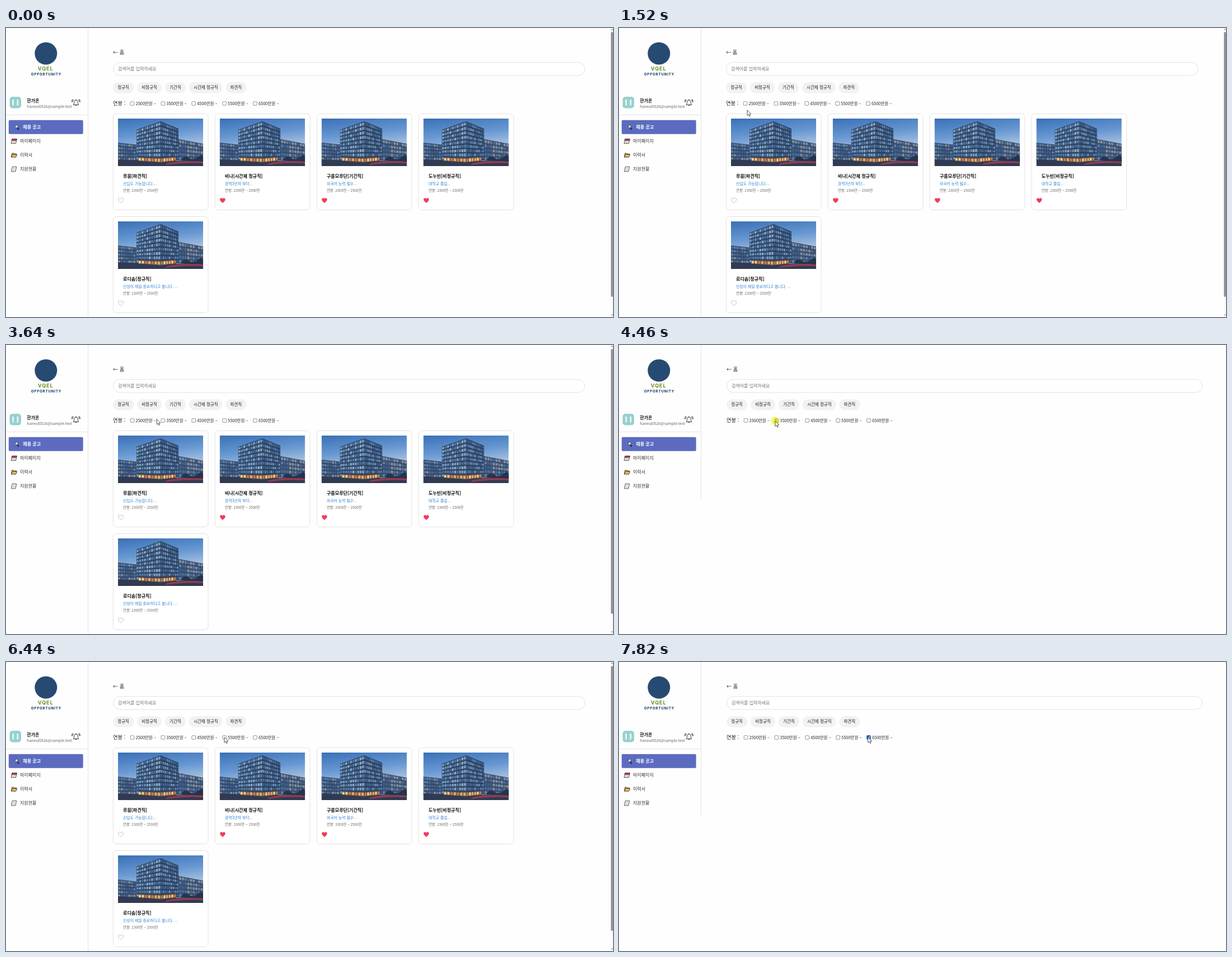
Animation of 1084 by 517 pixels, one loop 8 s. Source, as an HTML page:

```html
<!DOCTYPE html>
<html lang="ko">
<head>
<meta charset="utf-8">
<title>채용 공고</title>
<style>
  html, body { margin: 0; width: 100%; height: 100%; overflow: hidden; background: #fefefe; }
  svg { display: block; width: 100%; height: 100%; }
  text { font-family: "Noto Sans CJK KR", "Noto Sans CJK", "Noto Sans", sans-serif; white-space: pre; }
  .logo { font-family: Inter, sans-serif; font-weight: 800; text-anchor: middle; }
</style>
</head>
<body>
<svg id="stage" viewBox="0 0 1084 517" lang="ko"></svg>
<script>
const LOOP = 8000;
const PITCH = 54.85;
const CARD = { w: 170, h: 172 };

const text = (x, y, size, str, fill = '#222', extra = '') =>
  `<text x="${x}" y="${y}" font-size="${size}" fill="${fill}" ${extra}>${str}</text>`;
const rect = (x, y, w, h, fill, extra = '') =>
  `<rect x="${x}" y="${y}" width="${w}" height="${h}" fill="${fill}" ${extra}/>`;
const path = (d, fill, extra = '') => `<path d="${d}" fill="${fill}" ${extra}/>`;
const bold = 'font-weight="700"';

let seed = 11;
const rand = () => (seed = (seed * 16807) % 2147483647) / 2147483647;
const pick = list => list[Math.floor(rand() * list.length)];

// One facade: a grid of windows between a left and a right edge [x, top, bottom]
function facade(a, b, cols, rows, wall, glass) {
  const mix = (p, q, k) => p + (q - p) * k;
  const at = (u, v) => {
    const y = mix(mix(a[1], b[1], u), mix(a[2], b[2], u), v);
    return mix(a[0], b[0], u).toFixed(1) + ' ' + y.toFixed(1);
  };
  const quad = (u, v, w, h) => `M${at(u, v)}L${at(u + w, v)}L${at(u + w, v + h)}L${at(u, v + h)}Z`;
  let out = path(quad(0, 0, 1, 1), wall);
  for (let r = 0; r < rows; r++)
    for (let c = 0; c < cols; c++)
      out += path(quad((c + .12) / cols, (r + .2) / rows, .76 / cols, .64 / rows), pick(glass));
  return out;
}

function photo() {
  const front = ['#6d90b6', '#5579a5', '#7f9fc0', '#4a6b96', '#93a9bd'];
  const side = ['#5d80aa', '#496b98', '#7392b6', '#3f5f8b'];
  const low = ['#4c6c95', '#5f80a6', '#405e88', '#8c9095'];
  const warm = ['#f0cb8c', '#e0aa70', '#c07a58'];
  let out = rect(0, 0, 152, 85, 'url(#sky)');
  out += facade([0, 43, 75], [36, 47, 75], 8, 5, '#33486a', low);
  out += facade([104, 36, 75], [152, 45, 77], 10, 5, '#364d70', low);
  out += facade([33, 20, 74], [76, 5, 77], 10, 9, '#2c4568', front);
  out += facade([76, 5, 77], [108, 18, 74], 9, 9, '#29405f', side);
  out += path('M0 73L76 77L152 74V85H0Z', '#303a52');
  out += facade([36, 69, 76], [76, 70, 79], 7, 1, '#59483f', warm);
  out += facade([76, 70, 79], [104, 68, 76], 6, 1, '#59483f', warm);
  out += path('M112 75Q118 64 126 70T142 69T152 68V77Z', '#25344c');
  out += path('M88 80Q116 74 152 77V80Q122 78 84 83Z', '#b53d52', 'opacity=".75"');
  return out;
}

const heartPath = 'M0 4.4C-2.2 2.5-4.7.6-4.7-1.8C-4.7-3.4-3.5-4.4-2.3-4.4C-1.2-4.4-.4-3.8 0-2.9' +
  'C.4-3.8 1.2-4.4 2.3-4.4C3.5-4.4 4.7-3.4 4.7-1.8C4.7.6 2.2 2.5 0 4.4Z';

const jobs = [
  ['루뭄[파견직]', '신입도 가능합니다....', 0],
  ['비냐[시간제 정규직]', '경력3년차 부터...', 1],
  ['구름모루단[기간직]', '외국어 능력 필수...', 1],
  ['도누빈[비정규직]', '대학교 졸업...', 1],
  ['로디솜[정규직]', '인성이 제일 중요하다고 봅니다. ...', 0]
];
const cardAt = i => [191 + (i % 4) * 181.85, 153 + Math.floor(i / 4) * 184];

function card([title, note, liked], i) {
  const ink = liked ? '#ef3b5b' : '#b5b5b5';
  return `<g transform="translate(${cardAt(i)})">` +
    rect(.4, .4, CARD.w - .4, CARD.h, '#fff',
      `id="card${i}" rx="5.5" stroke="#dcdcdc" stroke-width=".8"`) +
    '<use href="#photo" x="9" y="9"/>' +
    text(18, 114.6, 8.05, title, '#111', bold) +
    text(18, 127.6, 6.88, note, '#2a80d2') +
    text(18, 139.6, 6.4, '연봉: 2300만 ~ 2500만', '#666') +
    path(heartPath, liked ? ink : '#fff',
      `transform="translate(14 155.6)" stroke="${ink}" stroke-width="${liked ? .2 : .8}"`) +
    '</g>';
}

function pills() {
  let x = 191;
  return ['정규직', '비정규직', '기간직', '시간제 정규직', '파견직'].map(label => {
    const w = (label.replace(' ', '').length * .92 + (label.includes(' ') ? .224 : 0)) * 7.55 + 16.4;
    const out = rect(x, 97, w, 19.5, '#f2f2f2', 'rx="9.7"') + text(x + 8.2, 109.4, 7.55, label);
    x += w + 5.7;
    return out;
  }).join('');
}

const boxes = () => [2500, 3500, 4500, 5500, 6500].map((n, i) => {
  const x = 221.8 + i * PITCH;
  return rect(x + .4, 131.7, 6.6, 6.6, '#fff', 'rx="1.2" stroke="#767676" stroke-width=".8"') +
    `<g id="tick${i}">` + rect(x, 131.3, 7.4, 7.4, '#0b63ce', 'rx="1.3"') +
    path(`M${x + 1.5} 135.2l1.6 1.6l2.9-3.6`, 'none', 'stroke="#fff" stroke-width="1.1"') + '</g>' +
    text(x + 9.7, 137.9, 7.45, n + '만원 ~');
}).join('');

function menuIcons() {
  const ink = 'stroke="#333" stroke-width=".8"';
  const slant = (y, body) => `<g transform="translate(14 ${y}) skewX(-12)">${body}</g>`;
  return slant(177.5, path('M6.4 1L9 3.8', 'none', 'stroke="#222" stroke-width="1.8" stroke-linecap="round"') +
      `<circle cx="4.6" cy="-1.2" r="2.7" fill="#bfe0f5" ${ink}/>`) +
    slant(202.5, rect(-4, -4, 8.4, 8.2, '#f3f3f3', ink) + rect(-4, -4, 8.4, 2.8, '#dd3a45', ink) +
      path('M-2.6 .6h5.6M-2.6 2.4h5.6', 'none', 'stroke="#aaa" stroke-width=".7"')) +
    slant(227.5, path('M-4-3.4h3l1 1h4.4v5.8h-8.4Z', '#d99a3c', ink) +
      path('M-4 3.4L-2.6-.8h8L4.4 3.4Z', '#f6c76a', ink)) +
    slant(252.5, rect(-3.6, -4.3, 7.4, 8.6, '#fafafa', ink) +
      path('M-2-2h4.2M-2 0h4.2M-2 2h4.2', 'none', 'stroke="#999" stroke-width=".6"'));
}

function sidebar() {
  const line = 'stroke="#dedede" stroke-width=".8"';
  return '<circle cx="71.3" cy="45.5" r="20" fill="#274a72"/>' +
    text(70.6, 76.3, 9, 'VQEL', '#7c9a3d', 'class="logo" letter-spacing=".9"') +
    text(72, 84.8, 6.1, 'OPPORTUNITY', '#274a72', 'class="logo" letter-spacing=".85"') +
    rect(6.5, 123, 20.5, 20.5, '#95d1cf', 'rx="5"') +
    rect(11.4, 128, 2.6, 10.5, '#f2f6f6') + rect(19.5, 128, 2.6, 10.5, '#f2f6f6') +
    text(37.3, 132.7, 8, '한가온', '#111', bold) +
    text(37.3, 143.1, 6.8, 'haneul0526@sample.test', '#666') +
    path('M120.4 137.2Q121.7 136 121.7 132.4Q121.9 128.9 124.9 128.9T128.1 132.4Q128.1 136 129.4 137.2Z' +
      'M123.5 137.5Q124.9 140.4 126.3 137.5M124.9 127.8V128.9' +
      'M120.3 128.2Q118.9 129.6 119 132M118.6 127.6Q117.2 129.5 117.4 132' +
      'M129.5 128.2Q130.9 129.6 130.8 132M131.2 127.6Q132.6 129.5 132.4 132',
      'none', 'stroke="#222" stroke-width=".9" stroke-linecap="round"') +
    `<path d="M0 155.5H146.5" ${line}/><path id="edge" ${line}/>` +
    rect(4.8, 164.7, 132.9, 25.1, '#5c6bc0', 'rx="2"') +
    text(30.3, 180.4, 8.05, '채용 공고', '#fff', bold) +
    ['마이페이지', '이력서', '지원현황'].map((s, i) => text(25, 205.4 + 25 * i, 8, s, '#333')).join('') +
    menuIcons();
}

const stage = document.getElementById('stage');
stage.innerHTML =
  `<defs><linearGradient id="sky" x1="0" y1="0" x2=".2" y2="1">
    <stop offset="0" stop-color="#3a70b6"/><stop offset=".4" stop-color="#6798d2"/>
    <stop offset=".75" stop-color="#b4c8e2"/></linearGradient>
    <filter id="lift" x="-10%" y="-10%" width="120%" height="120%">
    <feDropShadow dx="0" dy="2" stdDeviation="2.6" flood-opacity=".12"/></filter>
    <g id="photo">${photo()}</g></defs>` +
  rect(0, 0, 1084, 517, '#fefefe') + sidebar() +
  '<g id="head">' + text(191, 47, 9.2, '← 홈') +
  rect(191.4, 61.7, 842.4, 23.2, '#fff', 'id="search" rx="11.6" stroke="#dadada" stroke-width=".8"') +
  text(200, 76.4, 8, '검색어를 입력하세요', '#757575') + pills() +
  text(191, 138.4, 9.3, '연봉 :') + boxes() + '</g>' +
  `<g id="list">${jobs.map(card).join('')}` +
  rect(1079.5, 0, 4.5, 517, '#fafafa') + rect(1080.4, 7, 3.4, 474, '#8b8b8b', 'rx="1.7"') +
  path('M1080.4 3.4h3.4L1082.1 1ZM1080.4 512.4h3.4L1082.1 514.8Z', '#8b8b8b') + '</g>' +
  '<circle id="press" r="7.4" fill="#f8f41c" opacity=".74"/>' +
  path('M0 0V9.6L2.2 7.6L3.8 11.1L5.4 10.4L3.9 7.1L6.8 6.9Z', '#fff',
    'id="arrow" stroke="#222" stroke-width=".75" stroke-linejoin="round"');

const $ = id => document.getElementById(id);
const show = (id, on) => $(id).setAttribute('visibility', on ? 'visible' : 'hidden');

// Pointer stops: time, x, y
const stops = [
  [210, 996, 488], [770, 238, 131], [980, 244, 168], [1310, 244, 168], [1520, 229, 147],
  [2280, 225.3, 138], [2950, 225.3, 138], [3400, 256, 128], [3840, 279, 136],
  [4530, 279, 136], [4810, 333.3, 134.5], [5550, 333.3, 134.5], [6510, 390.8, 134.5],
  [7050, 390.8, 134.5], [7750, 444.7, 134.5], [LOOP, 444.7, 134.5]
];
// Each box: press to check, press to uncheck; the page answers DELAY later
const DELAY = 70;
const clicks = [[2350, 2880], [3840, 4460], [5010, 5480], [6580, 6980], [7750, LOOP]];
const within = (t, from, to) => t >= from && t < to;
const checked = (t, [on, off]) => within(t, on + DELAY, off + DELAY);

function pointer(t) {
  const i = Math.max(1, stops.findIndex(s => s[0] > t));
  const [t0, x0, y0] = stops[i - 1], [t1, x1, y1] = stops[i];
  const k = Math.min(1, Math.max(0, (t - t0) / (t1 - t0)));
  const e = i === 1 ? 1 - (1 - k) ** 2 : k * k * (3 - 2 * k);
  return [x0 + (x1 - x0) * e, y0 + (y1 - y0) * e];
}

function draw(t) {
  const empty = clicks.slice(1).some(c => checked(t, c));
  const [px, py] = pointer(t);
  const at = `translate(${px.toFixed(2)} ${py.toFixed(2)})`;
  show('list', !empty);
  $('head').setAttribute('transform', `translate(${empty ? 1 : 0} 0)`);
  $('search').setAttribute('width', empty ? 849.4 : 842.4);
  $('edge').setAttribute('d', `M146.5 0V${empty ? 275 : 517}`);
  clicks.forEach((c, i) => show('tick' + i, checked(t, c)));
  jobs.forEach((job, i) => {
    const [x, y] = cardAt(i);
    const over = t >= 210 && within(px, x, x + CARD.w) && within(py, y, y + CARD.h);
    $('card' + i).setAttribute('filter', over ? 'url(#lift)' : 'none');
  });
  show('press', clicks.flat().some(c => within(t, c, c + DELAY)));
  show('arrow', t >= 210);
  $('press').setAttribute('transform', at);
  $('arrow').setAttribute('transform', at);
}

const start = performance.now();
function tick() {
  draw((performance.now() - start) % LOOP);
  requestAnimationFrame(tick);
}
tick();
</script>
</body>
</html>
```
